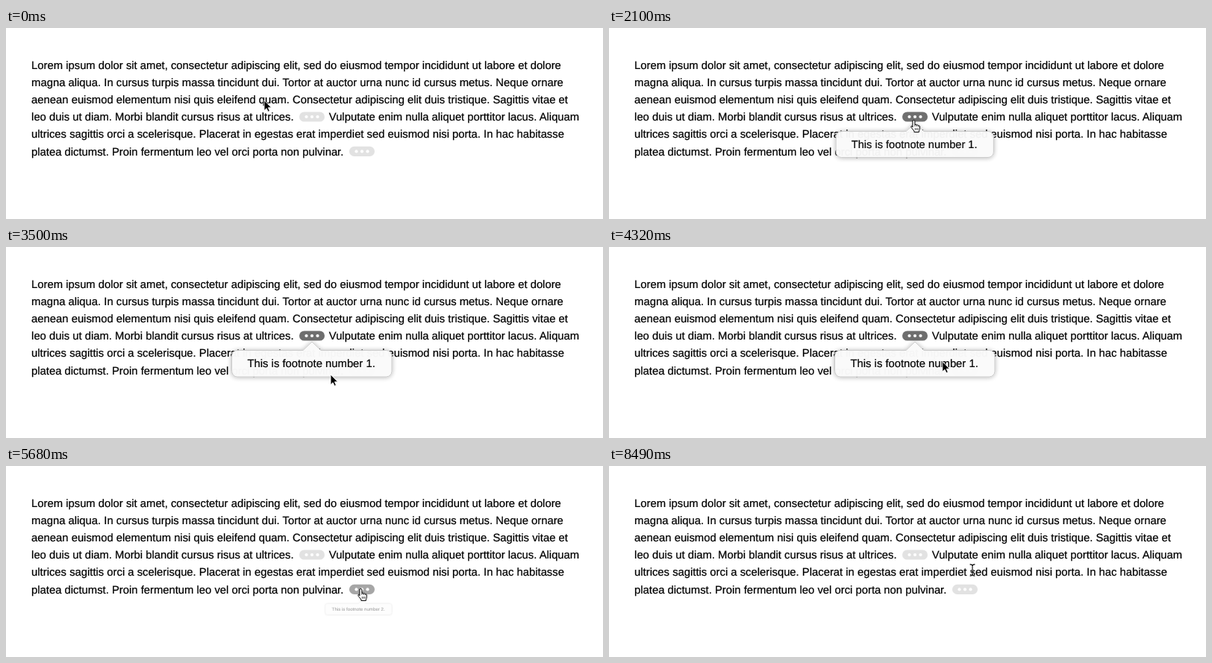
Recreate the animation shown at these times as an HTML page. Size 800 by 256 pixels, loop 8.67 s.

```html
<!DOCTYPE html>
<html lang="la">
<head>
<meta charset="utf-8">
<title>Footnote popovers</title>
<style>
  html, body { margin: 0; width: 100%; height: 100%; overflow: hidden; background: #fff; }
  svg { display: block; width: 800px; height: 256px; }
  text {
    font: 14.82px "Liberation Sans", Arial, sans-serif;
    fill: #000; stroke: #000; stroke-width: .22px;
    text-rendering: geometricPrecision;
  }
</style>
</head>
<body>
<svg id="stage" viewBox="0 0 800 256">
  <defs>
    <filter id="shadow" x="-20%" y="-50%" width="140%" height="200%">
      <feDropShadow dx="0" dy="0.5" stdDeviation="3" flood-color="#000" flood-opacity=".3"/>
    </filter>
    <path id="caret" d="M-3-7.6Q0-7.6 0-5.4Q0-7.6 3-7.6M0-5.4V5.4M-3 7.6Q0 7.6 0 5.4Q0 7.6 3 7.6M-1.8 2.6H1.8"/>
  </defs>
  <g id="page"></g>
  <g id="cursor">
    <path id="arrow" d="M0 0V13.6L3.1 10.7 5.2 15.3 7.4 14.3 5.4 9.8H9.6Z" fill="#000" stroke="#fff" stroke-width=".9"/>
    <g id="beam" fill="none" stroke-linecap="round">
      <use href="#caret" stroke="#fff" stroke-width="2.4" opacity=".8"/>
      <use href="#caret" stroke="#000" stroke-width="1.1"/>
    </g>
    <g id="hand" stroke="#000" stroke-width="1" stroke-linejoin="round">
      <path d="M-1.5 1.4A1.5 1.5 0 0 1 1.5 1.4V6Q2.9 5 3.8 6.4Q5.3 5.7 6 7.1Q7.8 6.7 8 8.3V11.2Q8 12.8 7 14.2V15.8H.5V14.4L-3.2 9.8Q-4.1 8 -3 7.6Q-2.2 7.3 -1.5 9.2Z" fill="#fff"/>
      <path d="M1.5 6V8.2M3.8 6.4V8.4M6 7.1V8.7M1.9 10.4V13.2M3.8 10.4V13.2M5.7 10.4V13.2" fill="none" stroke-width=".7"/>
    </g>
  </g>
</svg>
<script>
const LOOP = 8670;
const $ = id => document.getElementById(id);
const page = $("page");

function add(parent, tag, attrs, content) {
  const el = document.createElementNS("http://www.w3.org/2000/svg", tag);
  for (const key in attrs) el.setAttribute(key, attrs[key]);
  if (content) el.textContent = content;
  return parent.appendChild(el);
}

const lines = [
  "Lorem ipsum dolor sit amet, consectetur adipiscing elit, sed do eiusmod tempor incididunt ut labore et dolore",
  "magna aliqua. In cursus turpis massa tincidunt dui. Tortor at auctor urna nunc id cursus metus. Neque ornare",
  "aenean euismod elementum nisi quis eleifend quam. Consectetur adipiscing elit duis tristique. Sagittis vitae et",
  "leo duis ut diam. Morbi blandit cursus risus at ultrices.",
  "ultrices sagittis orci a scelerisque. Placerat in egestas erat imperdiet sed euismod nisi porta. In hac habitasse",
  "platea dictumst. Proin fermentum leo vel orci porta non pulvinar."
];
const baseline = row => 54.6 + 23.2 * row;
lines.forEach((line, row) => add(page, "text", { x: 34.1, y: baseline(row) }, line));
add(page, "text", { x: 432.8, y: baseline(3) }, "Vulputate enim nulla aliquet porttitor lacus. Aliquam");

function makePill(cx, cy) {
  const body = add(page, "rect", { x: cx - 17, y: cy - 6.6, width: 34, height: 13.2, rx: 6.6, fill: "#6e6e6e" });
  for (const dx of [-7.5, 0, 7.5]) add(page, "circle", { cx: cx + dx, cy, r: 2.1, fill: "#fff" });
  return body;
}

// The popover's own origin is the middle of its arrow base.
function makePopover(left, label) {
  const right = left + 214.5, h = 35.5, r = 7.4;
  const g = add(page, "g", {});
  add(g, "path", {
    d: `M${left + r} 0H-12L0-11.5 12 0H${right - r}a${r} ${r} 0 0 1 ${r} ${r}V${h - r}a${r} ${r} 0 0 1 ${-r} ${r}H${left + r}a${r} ${r} 0 0 1 ${-r} ${-r}V${r}a${r} ${r} 0 0 1 ${r} ${-r}Z`,
    fill: "#fafafa", stroke: "#c3c3c3", "stroke-width": .9, filter: "url(#shadow)"
  });
  add(g, "text", { x: left + 21, y: 22.6 }, label);
  return g;
}

// first: when the opening becomes visible, a little after open.
const notes = [
  { x: 410, y: 138.5, pill: makePill(410, 119), left: -107.5, hover: 1560, open: 1893, first: 1970, close: 4647, fade: 4690 },
  { x: 477.3, y: 184.5, pill: makePill(477, 165.4), left: -119, hover: 5210, open: 5625, first: 5680, close: 8160, fade: 8240 }
];
notes.forEach((note, i) => note.pop = makePopover(note.left, `This is footnote number ${i + 1}.`));

const clamp = v => Math.min(1, Math.max(0, v));

// CSS "ease", cubic-bezier(.25, .1, .25, 1)
function ease(x) {
  x = clamp(x);
  let lo = 0, hi = 1;
  const curve = (a, b, s) => 3 * a * s * (1 - s) ** 2 + 3 * b * s * s * (1 - s) + s ** 3;
  for (let i = 0; i < 20; i++) {
    const mid = (lo + hi) / 2;
    if (curve(.25, .25, mid) < x) lo = mid; else hi = mid;
  }
  return curve(.1, 1, lo);
}
const since = (t, start, span = 250) => ease((t - start) / span);

function drawNote(note, t) {
  const opened = t < note.first ? 0 : since(t, note.open);
  const closed = since(t, note.close);
  const shown = opened * (1 - closed);
  const alpha = closed ? .98 * shown ** 1.5 : .98 * shown;
  note.pop.setAttribute("transform", `translate(${note.x} ${note.y}) scale(${.1 + .9 * shown})`);
  note.pop.setAttribute("opacity", alpha);
  note.pop.setAttribute("display", alpha > .004 ? "inline" : "none");
  const raised = .2 + .2 * since(t, note.hover, 170) + .6 * opened;
  note.pill.setAttribute("opacity", raised - .8 * since(t, note.fade));
}

const track = [
  [0, 346, 97], [30, 346, 97], [330, 352, 104], [600, 352, 104], [1230, 367, 109],
  [1430, 367, 109], [1700, 408.4, 123.7], [2420, 408.4, 123.7], [2760, 424, 160],
  [3010, 437, 197], [3270, 437, 178], [3300, 437, 178], [3500, 435, 171],
  [4070, 440, 165], [4210, 440, 165], [4620, 478, 101], [5110, 478, 101],
  [5380, 475.4, 164.6], [6250, 475.4, 164.6], [6350, 478.4, 161.6], [6950, 478.4, 161.6],
  [7310, 487, 148], [7880, 487, 148], [8010, 487, 139.5], [LOOP, 487, 139.5]
];
const shapes = [[0, "arrow"], [170, "beam"], [1600, "hand"], [2500, "arrow"], [4420, "beam"], [5280, "hand"], [7080, "beam"]];

function drawCursor(t) {
  const i = track.findIndex(point => point[0] > t);
  const [t0, x0, y0] = track[i - 1], [t1, x1, y1] = track[i];
  const u = (t - t0) / (t1 - t0), k = u * u * (3 - 2 * u);
  $("cursor").setAttribute("transform", `translate(${x0 + (x1 - x0) * k} ${y0 + (y1 - y0) * k})`);
  const current = shapes.filter(shape => shape[0] <= t).pop()[1];
  for (const id of ["arrow", "beam", "hand"]) $(id).setAttribute("display", id === current ? "inline" : "none");
}

function draw(t) {
  notes.forEach(note => drawNote(note, t));
  drawCursor(t);
}

const start = performance.now();
function tick() {
  draw((performance.now() - start) % LOOP);
  requestAnimationFrame(tick);
}
tick();
</script>
</body>
</html>
```
